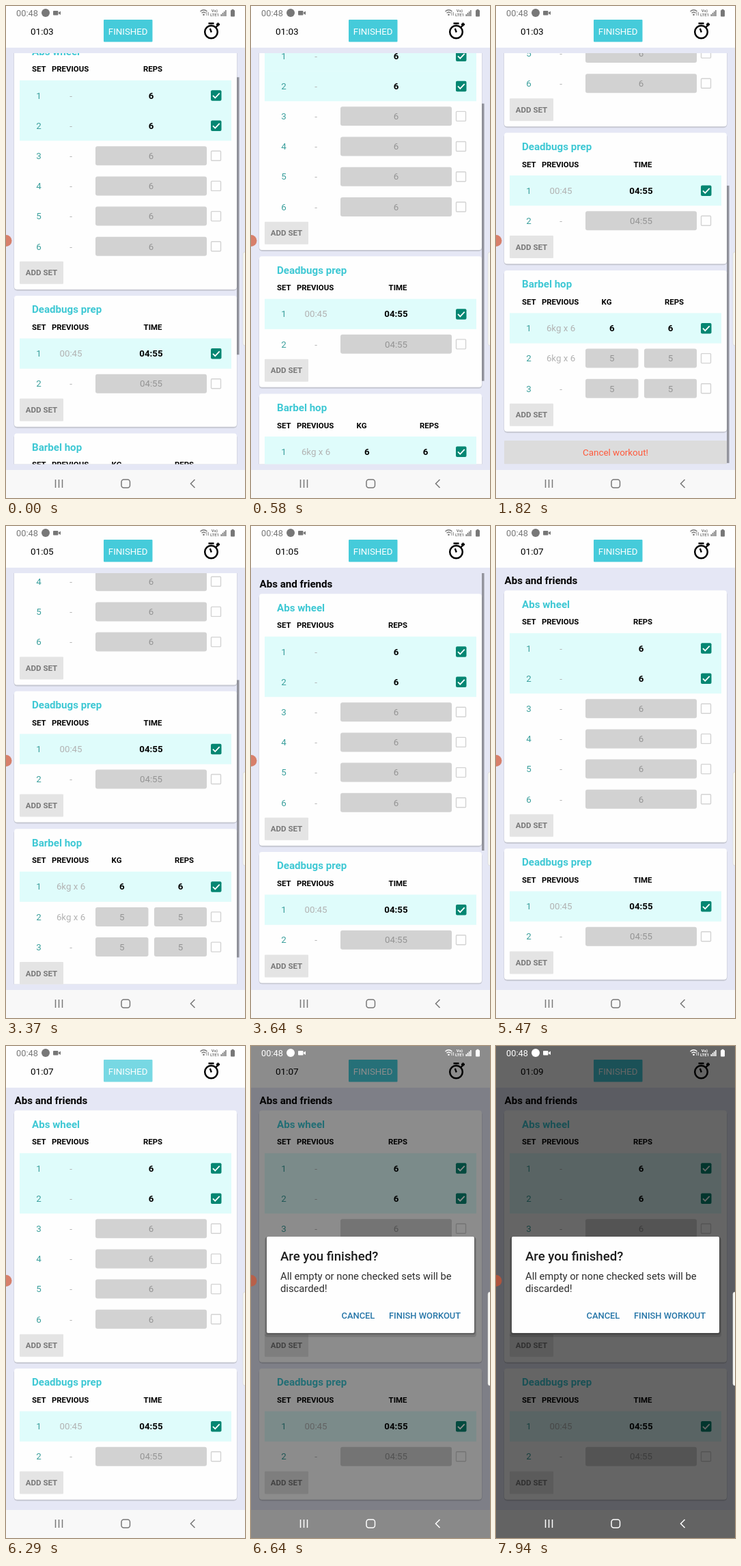
An HTML page that plays this animation: 350 px wide and 720 px high, repeating every 8000 ms.

```html
<!DOCTYPE html>
<html lang="en">
<head>
<meta charset="utf-8">
<title>Workout</title>
<style>
html, body { margin: 0; width: 100%; height: 100%; overflow: hidden; background: #fefefe; }
svg { display: block; width: 100vw; height: 100vh; color: #777; }
svg.modal { color: #fff; }
text { font-family: Roboto, "Noto Sans", sans-serif; white-space: pre; }
</style>
</head>
<body>
<svg id="stage" viewBox="0 0 350 720"></svg>
<script>
const LOOP = 8000;
const stage = document.getElementById('stage');

const C = {
  head: '#fefefe', bg: '#e5e7f5', card: '#fefefe', shade: '#c6c8d2', mint: '#dffcfb',
  title: '#3ec8d4', num: '#3a9f9c', prev: '#b2b2b2', box: '#d2d2d2', boxText: '#949494',
  add: '#e4e4e4', addText: '#787878', check: '#058672', edge: '#d3d3d3',
  btn: '#45cbda', nav: '#f8f8f8', cancel: '#dcdcdc', alert: '#ff5a3c',
  ink: '#000', link: '#2676a8', sys: 'currentColor'
};

const rect = (x, y, w, h, fill, r = 0, more = '') =>
  `<rect x="${x}" y="${y}" width="${w}" height="${h}" rx="${r}" fill="${fill}" ${more}/>`;
const path = (d, stroke, width) =>
  `<path d="${d}" fill="none" stroke="${stroke}" stroke-width="${width}"/>`;
// y is the middle of the capital letters
const text = (x, y, s, size, fill, weight = 400, anchor = 'middle', more = '') =>
  `<text x="${x}" y="${y + size * 0.355}" font-size="${size}" font-weight="${weight}" text-anchor="${anchor}" fill="${fill}" ${more}>${s}</text>`;
const label = (x, y, s, size, fill, weight = 400, more) =>
  text(x, y, s, size, fill, weight, 'start', more);

const PITCH = 44.2;

function checkbox(y, done) {
  if (!done) return rect(300.5, y - 7, 14, 14, 'none', 1, `stroke="${C.edge}" stroke-width="1.4"`);
  return rect(300, y - 7.5, 15.5, 15.5, C.check, 2) +
    path(`M303 ${y + .3}l3.3 3.4 6.4-6.8`, '#fff', 1.8);
}

function row(y, n, { prev = '-', done, value }, cols) {
  let s = done ? rect(20, y - 22, 310, PITCH, C.mint) : '';
  s += text(48, y, n, 13.3, C.num) + text(95, y, prev, 13.3, C.prev);
  for (const c of cols) {
    if (!done) s += rect(c.x, y - 14, c.w, 28, C.box, 3);
    s += text(c.x + c.w / 2, y, value, 13.3, done ? C.ink : C.boxText, done ? 700 : 400);
  }
  return s + checkbox(y, done);
}

function card(top, title, cols, rows) {
  const first = top + 84.5;
  const add = first + PITCH * (rows.length - 1) + 38.4;
  const h = add + 24.6 - top;
  return rect(11.5, top + .8, 327, h + 1.2, C.shade, 5) + rect(12, top, 326, h, C.card, 4) +
    label(38, top + 20, title, 15.1, C.title, 700) +
    label(38, top + 46, 'SET', 11.4, C.ink, 700) +
    label(67, top + 46, 'PREVIOUS', 11.4, C.ink, 700) +
    cols.map(c => text(c.at, top + 46, c.name, 11.4, C.ink, 700)).join('') +
    rows.map((r, i) => row(first + i * PITCH, i + 1, r, cols)).join('') +
    rect(20, add - 16.5, 64, 33, C.add, 1) + text(52, add, 'ADD SET', 11.5, C.addText, 700);
}

const wide = name => [{ name, at: 215, x: 131, w: 163 }];
const pair = [{ name: 'KG', at: 162, x: 131, w: 77.5 }, { name: 'REPS', at: 261, x: 217, w: 77 }];
const open = { value: 6 };
const did = { value: 6, done: true };

const list =
  label(12.5, 85, 'Abs and friends', 15.1, C.ink, 700) +
  card(99.3, 'Abs wheel', wide('REPS'), [did, did, open, open, open, open]) +
  card(477, 'Deadbugs prep', wide('TIME'), [
    { prev: '00:45', value: '04:55', done: true }, { value: '04:55' }]) +
  card(678.4, 'Barbel hop', pair, [
    { prev: '6kg x 6', value: 6, done: true }, { prev: '6kg x 6', value: 5 }, { value: 5 }]) +
  rect(12, 927.5, 326, 34.5, C.cancel, 1) + text(175, 945, 'Cancel workout!', 13.4, C.alert);

const statusBar =
  label(15, 10.5, '00:48', 12.8, C.sys) +
  `<circle cx="58" cy="10" r="6" fill="${C.sys}"/>` +
  rect(69, 7, 7.5, 6.5, C.sys, 1) + `<path d="M77 9.5l3-2v5.5l-3-2z" fill="${C.sys}"/>` +
  path('M284.5 8q5-4.5 10 0M286.5 10.3q3-2.7 6 0', C.sys, 1.4) +
  `<circle cx="289.5" cy="12.7" r="1.3" fill="${C.sys}"/>` +
  path('M294 9v5M296.5 14v-5', C.sys, .8) +
  text(305.5, 7.3, 'Vo)', 6, C.sys, 700) + text(305.5, 13, 'LTE1', 6, C.sys, 700) +
  [0, 1, 2, 3].map(i => rect(314.5 + i * 2.2, 12 - i * 2, 1.5, 3 + i * 2, C.sys)).join('') +
  rect(329, 6, 6, 9.5, C.sys, 1) + rect(330.5, 4.8, 3, 1.5, C.sys);

const stopwatch =
  `<circle cx="300.5" cy="38" r="9.3" fill="none" stroke="${C.ink}" stroke-width="2.5"/>` +
  path('M296.5 25.5h8M300.8 38.5l-2-5.500M307.5 31l2-2M310.5 24.5v5M308 27h5', C.ink, 2.3);

const navIcons =
  path('M72.5 693v12M77.5 693v12M82.5 693v12M276.5 693l-6 6 6 6', C.sys, 1.5) +
  rect(169, 693, 12.5, 12, 'none', 3.5, `stroke="${C.sys}" stroke-width="1.5"`);

const dialog =
  rect(20, 280, 310, 146, '#000', 4, 'opacity=".12"') +
  rect(21.5, 279, 307, 143.5, '#000', 3, 'opacity=".2"') + rect(23, 279, 304, 141, '#fefefe', 2) +
  label(43, 307.5, 'Are you finished?', 18.6, '#1c1c1c', 500) +
  label(43, 337, 'All empty or none checked sets will be', 14.8, '#2c2c2c') +
  label(43, 354.5, 'discarded!', 14.8, '#2c2c2c') +
  label(132.5, 394.5, 'CANCEL', 12.9, C.link, 500) +
  label(202, 394.5, 'FINISH WORKOUT', 12.9, C.link, 500);

stage.innerHTML =
  `<clipPath id="view"><rect y="69" width="350" height="601.5"/></clipPath>` +
  rect(0, 0, 350, 720, C.bg) +
  `<g clip-path="url(#view)"><g id="list">${list}</g></g>` +
  rect(338, 0, 3.5, 406, '#000', 0, 'id="bar"') +
  rect(0, 0, 350, 61, C.head) +
  label(36, 37, '', 13.5, C.ink, 400, 'id="clock"') +
  `<g id="finish">${rect(143, 20, 71.5, 32.5, C.btn, 1)}${text(178.7, 37, 'FINISHED', 13.3, '#fff')}</g>` +
  stopwatch + rect(0, 679, 350, 41, C.nav) +
  rect(0, 0, 350, 720, '#000', 0, 'id="dim"') +
  statusBar + navIcons +
  `<circle cx="0" cy="343.5" r="8.5" fill="#d2532f" opacity=".7"/>` +
  rect(347, 360, 8, 137, '#f8f8f4', 3, 'stroke="#d4d4d4" stroke-width=".6"') +
  `<g id="dialog">${dialog}</g>`;

const [listEl, bar, clock, finish, dim, dialogEl] =
  ['list', 'bar', 'clock', 'finish', 'dim', 'dialog'].map(id => document.getElementById(id));

const clamp = x => Math.min(1, Math.max(0, x));
const span = (t, a, b) => clamp((t - a) / (b - a));
const mix = (a, b, k) => a + (b - a) * k;
const smooth = k => k * k * (3 - 2 * k);
const easeIn = k => k * k;
const easeOut = k => 1 - (1 - k) ** 2;

// start, end, scroll reached, easing
const moves = [
  [100, 1600, 291.5, smooth],
  [3220, 3370, 237, easeIn],
  [3370, 3630, 0, easeOut],
  [3660, 4190, 5, smooth]
];
const scrollAt = t => moves.reduce((y, [a, b, to, ease]) => mix(y, to, ease(span(t, a, b))), 53);

// moments at which the seconds go up
const ticks = [2000, 2900, 4000, 4800, 6750, 7250];

function draw(t) {
  const y = scrollAt(t);
  listEl.setAttribute('transform', `translate(0 ${-y})`);
  bar.setAttribute('y', 69 + y * 0.665);
  const shown = Math.max(1 - span(t, 2100, 2350), span(t, 3200, 3260)) * (1 - span(t, 4490, 4740));
  bar.setAttribute('opacity', 0.36 * shown);

  clock.textContent = '01:0' + (3 + ticks.filter(at => t >= at).length);
  finish.setAttribute('opacity', 1 - 0.6 * span(t, 6250, 6340) * (1 - span(t, 6400, 6550)));

  // the dialog is up before the shade behind it is complete
  dim.setAttribute('opacity', 0.6 * span(t, 6460, 6700));
  stage.classList.toggle('modal', t >= 6500);
  const k = easeOut(span(t, 6440, 6620));
  const size = mix(0.92, 1, k);
  dialogEl.setAttribute('opacity', k);
  dialogEl.setAttribute('transform', `translate(175 350) scale(${size}) translate(-175 -350)`);
}

const start = performance.now();
function frame() {
  draw((performance.now() - start) % LOOP);
  requestAnimationFrame(frame);
}
frame();
</script>
</body>
</html>
```
